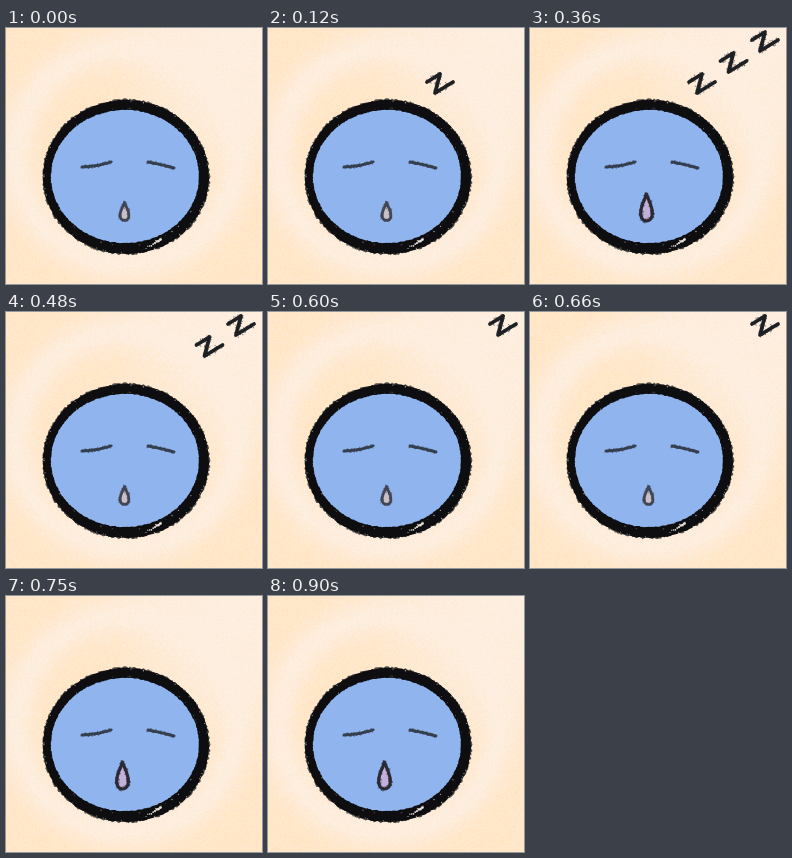
These frames come from a looping animation (256x256 px, 930 ms). An HTML page with a canvas:

```html
<!DOCTYPE html>
<html>
<head>
<meta charset="utf-8">
<style>
html, body { margin: 0; width: 100%; height: 100%; overflow: hidden; background: #feefe2; }
canvas { display: block; width: 256px; height: 256px; }
</style>
</head>
<body>
<canvas id="stage" width="256" height="256"></canvas>
<script>
const LOOP = 930, BEAT = 120, SIZE = 256;
const stage = document.getElementById('stage').getContext('2d');
const paper = document.createElement('canvas');
paper.width = paper.height = SIZE;

let seed;
function rand() {
  seed = (Math.imul(seed, 1664525) + 1013904223) >>> 0;
  return seed / 4294967296;
}
const spread = r => (rand() - 0.5) * 2 * r;

// Peach wash with a pale swirl around the face, fading to the upper right
function wash(x, y) {
  const dx = x - 120, dy = y - 149, d = Math.hypot(dx, dy);
  const swirl = 108 - 22 * dy / (d || 1);
  const corner = Math.hypot(SIZE - x, y) / 130;
  return .65 * (1 - .85 * Math.exp(-(((d - swirl) / 17) ** 2))) * (1 - .9 * Math.exp(-(corner ** 4)));
}

function dot(g, x, y, r, color) {
  g.fillStyle = color;
  g.beginPath();
  g.arc(x, y, r, 0, 7);
  g.fill();
}

// Grainy stroke through points: a solid core with a fringe of dabs
function chalk(g, pts, width, color) {
  g.strokeStyle = color;
  g.lineWidth = width * .75;
  g.lineCap = g.lineJoin = 'round';
  g.beginPath();
  pts.forEach(p => g.lineTo(...p));
  g.stroke();
  g.globalAlpha = .6;
  for (let i = 1; i < pts.length; i++) {
    const [x0, y0] = pts[i - 1], [x1, y1] = pts[i];
    const n = Math.ceil(Math.hypot(x1 - x0, y1 - y0) * 2);
    for (let k = 0; k < n; k++) {
      const t = k / n;
      dot(g, x0 + (x1 - x0) * t + spread(width * .5), y0 + (y1 - y0) * t + spread(width * .5), .65, color);
    }
  }
  g.globalAlpha = 1;
}

function blob(g, x, y, rx, ry, rough, color) {
  g.fillStyle = color;
  g.beginPath();
  for (let a = 0; a < 2 * Math.PI; a += .02) {
    const j = spread(rough);
    g.lineTo(x + (rx + j) * Math.cos(a), y + (ry + j) * Math.sin(a));
  }
  g.fill();
}

function drawPaper() {
  const g = paper.getContext('2d');
  seed = 7;
  g.fillStyle = '#feefe3';
  g.fillRect(0, 0, SIZE, SIZE);
  g.fillStyle = '#ffe2ba';
  for (let y = 0; y < SIZE; y++)
    for (let x = 0; x < SIZE; x++) {
      g.globalAlpha = Math.min(1, Math.max(0, wash(x, y) + spread(.25)));
      g.fillRect(x, y, 1, 1);
    }
  g.globalAlpha = 1;

  blob(g, 120, 149, 83.5, 77.5, 1.2, '#55524f');
  blob(g, 120, 149, 83, 77, .5, '#0e0e10');
  blob(g, 119, 148.5, 74, 66.5, .4, '#8fb4ee');

  // Bare flecks where the ink skipped
  for (let i = 0; i < 60; i++) {
    const a = rand() * 2 * Math.PI, inset = rand() < .5 ? 1.5 : 8.5;
    dot(g, 120 + (83.5 - inset) * Math.cos(a), 149 + (77.5 - inset) * Math.sin(a), .3 + rand() * .4, '#a9a6a5');
  }
  for (let i = 0; i < 9; i++)
    dot(g, 140 + i * 1.8, 220 - i * 1.05 + spread(1), .5 + i * .12, '#e9e2dc');

  const eye = (x, y, dx, dy, bend) => {
    const pts = Array.from({ length: 9 }, (_, i) => {
      const t = i / 8;
      return [x + dx * t, y + dy * t + bend * Math.sin(Math.PI * t)];
    });
    chalk(g, pts, 3.8, '#36404f');
  };
  eye(76, 139, 29, -5, 1);
  eye(142, 134, 26, 6, -.3);
}

// Teardrop with a pointed top
function drawMouth(x, top, bottom, width, line, fill, ink) {
  const h = (bottom - top) / 2, pts = [];
  for (let i = 0; i <= 24; i++) {
    const a = i / 24 * 2 * Math.PI;
    pts.push([x + width * .7 * Math.sin(a) * Math.sin(a / 2) ** 1.5, top + h - h * Math.cos(a)]);
  }
  stage.fillStyle = fill;
  stage.beginPath();
  pts.forEach(p => stage.lineTo(...p));
  stage.fill();
  chalk(stage, pts, line, ink);
}

function drawZ(i) {
  const x = 159 + 31.5 * i, y = 54 - 21 * i;
  const pts = [[x, y], [x + 13, y - 8], [x + 8, y + 11], [x + 26, y]];
  chalk(stage, pts, 5, '#1f2124');
}

function draw(open, shown) {
  seed = 31;
  stage.drawImage(paper, 0, 0);
  if (open) drawMouth(116.5, 166, 193, 12, 4.2, '#c1b0da', '#2c2b36');
  else drawMouth(118.5, 174.5, 192.5, 9, 3.6, '#c9bfc6', '#424857');
  shown.forEach((on, i) => on && drawZ(i));
}

let last;
function tick(now) {
  const t = now % LOOP;
  const open = t >= 2 * BEAT && t < 4 * BEAT || t >= 750;
  // Each letter enters one beat after the one before and stays three
  const shown = [0, 1, 2].map(i => t >= BEAT * (i + 1) && t < BEAT * (i + 4));
  const key = open + shown.join();
  if (key !== last) draw(open, shown);
  last = key;
  requestAnimationFrame(tick);
}

drawPaper();
tick(performance.now());
</script>
</body>
</html>
```
